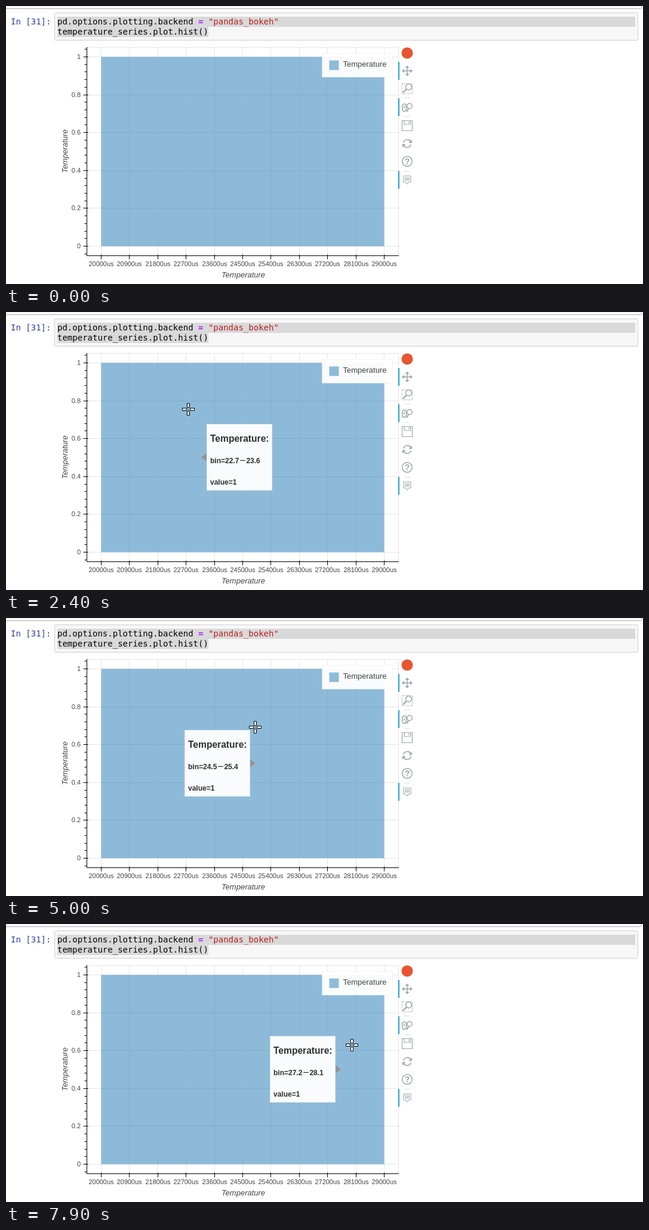
Write an HTML page that moves like this. It is 1067 by 467 pixels and loops after 8000 ms.

```html
<!DOCTYPE html>
<html lang="en">
<head>
<meta charset="utf-8">
<title>Histogram hover</title>
<style>
  html, body { margin: 0; width: 100%; height: 100%; overflow: hidden; background: #fff; }
  svg { display: block; width: 1067px; height: 467px; font-family: "Liberation Sans", Arial, sans-serif; }
  .code { font: 14px "DejaVu Sans Mono", monospace; white-space: pre; }
  .ticks { font-size: 11px; fill: #444; }
  .label { font-size: 13px; fill: #444; }
  .axis { font-style: italic; text-anchor: middle; }
  .icon { fill: none; stroke: #a1a6a9; stroke-width: 1.5; }
  .solid { fill: #a1a6a9; stroke: none; }
  .tip { font-weight: bold; font-size: 12px; fill: #2f2f2f; }
  .dash { font-family: "Noto Sans CJK SC", "Noto Sans CJK JP", "Noto Sans CJK", sans-serif; }
</style>
</head>
<body>
<svg viewBox="0 0 1067 467">
  <rect x="-5" y="-5" width="1069.5" height="9.5" rx="2" fill="#fff" stroke="#ababab"/>
  <path d="M0 .5H1062" stroke="#eee"/>

  <!-- code cell -->
  <rect x="81.5" y="11.5" width="977" height="46" rx="2" fill="#f7f7f7" stroke="#cfcfcf"/>
  <path d="M86 18H1054V35H339V52H86Z" fill="#d9d9d9"/>
  <g class="code">
    <text x="8" y="31" fill="#303f9f">In [31]:</text>
    <text x="86" y="31">pd.options.plotting.backend <tspan fill="#aa22ff" font-weight="bold">=</tspan> <tspan fill="#ba2121">"pandas_bokeh"</tspan></text>
    <text x="86" y="48">temperature_series.plot.hist()</text>
  </g>

  <!-- chart -->
  <path id="grid" stroke="#e5e5e5" fill="none"/>
  <rect x="135.5" y="69.5" width="522" height="350" fill="none" stroke="#e5e5e5"/>
  <g id="bars" fill="#1f77b4" fill-opacity=".5"></g>
  <path id="axes" stroke="#000" fill="none"/>
  <g id="ticks" class="ticks"></g>
  <text class="label axis" x="397.5" y="456">Temperature</text>
  <text class="label axis" transform="translate(103 244) rotate(-90)">Temperature</text>
  <rect x="529.5" y="79.5" width="118" height="40" fill="#fff" fill-opacity=".95" stroke="#e5e5e5" stroke-opacity=".5"/>
  <rect x="541.5" y="91.5" width="16" height="16" fill="#8fbbd9"/>
  <text class="label" x="564.5" y="102">Temperature</text>

  <!-- toolbar -->
  <circle cx="672" cy="79" r="9.5" fill="#e8552f"/>
  <path d="M658 94v30M658 155v30M658 277v30" stroke="#26a0d0" stroke-width="2"/>
  <path d="M667 154.5h10M667 185.5h10M667 277.5h10" stroke="#ddd"/>
  <g class="icon">
    <g transform="translate(672 109)">
      <path d="M-7 0H7M0 -7V7"/>
      <path class="solid" d="M0 -9l3.5 4h-7zM0 9l3.5 -4h-7zM-9 0l4 -3.5v7zM9 0l-4 -3.5v7z"/>
    </g>
    <rect x="663.5" y="130.5" width="17" height="17" stroke-width="1" stroke-dasharray="2 1.5"/>
    <circle cx="674.5" cy="136" r="5" fill="#fff"/>
    <path d="M671 139.5l-6 6" stroke-width="2.4"/>
    <rect x="664" y="164.5" width="6.5" height="12.5" rx="3.2"/>
    <path d="M667.2 168v4"/>
    <circle cx="676" cy="168" r="4.3"/>
    <path d="M674 172l-2.2 5.5" stroke-width="2"/>
    <path d="M663.5 192.5h17v17h-17zM667 192.5v6.5h10.5v-6.5M674.8 194v3" stroke-width="1.2"/>
    <path d="M665.5 229.5a7 7 0 0 1 12.5 -2M678.5 232.5a7 7 0 0 1 -12.5 2" stroke-width="1.6"/>
    <path class="solid" d="M680 224.5v5.500h-5.500zM664 237.500v-5.500h5.500z"/>
    <circle cx="672" cy="261" r="8.3"/>
    <text class="solid" x="672" y="266" font-size="14" font-weight="bold" text-anchor="middle">?</text>
    <path d="M666 285.5h12v10h-3l-3 3.5l-3 -3.5h-3zM668 288.5h8M668 290.5h8M668 292.5h8" stroke-width="1.1" stroke-linejoin="round"/>
  </g>

  <g id="tooltip" class="tip">
    <path id="pointer" fill="#909599"/>
    <rect x=".5" y="188.5" width="109" height="111" fill="#fff" fill-opacity=".95" stroke="#e0e6ea"/>
    <text x="6" y="218" font-size="15.6">Temperature:</text>
    <text x="6" y="254">bin=<tspan id="from"></tspan><tspan class="dash">－</tspan><tspan id="to"></tspan></text>
    <text x="6" y="290">value=1</text>
  </g>

  <g id="cursor" fill="#fff" stroke="#000" stroke-linejoin="round">
    <path id="arrow" d="M0 0v15l3.5 -3.5l2.500 5.500l2.500 -1l-2.500 -5.500h4.500z"/>
    <g id="cross"></g>
  </g>
</svg>
<script>
const LOOP = 8000, STEP = 100;
const LEFT = 159.5, TOP = 85.5, BOTTOM = 403.5, BINS = 10, BIN = 47.4;
const HOVER_SLACK = 2.5;
const $ = id => document.getElementById(id);
const crisp = v => Math.floor(v) + 0.5;
const repeat = (n, make) => Array.from({ length: n }, (_, i) => make(i)).join('');

function drawChart() {
  let grid = '', axes = 'M135.5 69V420M135 419.5H658', labels = '';
  for (let i = 0; i <= BINS; i++) {
    const x = crisp(LEFT + i * BIN);
    grid += `M${x} 69V419`;
    axes += `M${x} 417.5v8`;
    labels += `<text x="${x}" y="437" text-anchor="middle">${20000 + i * 900}us</text>`;
  }
  for (let i = -1; i <= 26; i++) {
    const y = crisp(BOTTOM - i * (BOTTOM - TOP) / 25);
    if (i % 5) {
      axes += `M131.5 ${y}h4`;
    } else {
      axes += `M129.5 ${y}h8`;
      grid += `M136 ${y}H657`;
      labels += `<text x="125" y="${y + 3.5}" text-anchor="end">${i / 25}</text>`;
    }
  }
  $('grid').setAttribute('d', grid);
  $('axes').setAttribute('d', axes);
  $('ticks').innerHTML = labels;
  $('bars').innerHTML = repeat(BINS, i =>
    `<rect x="${LEFT + i * BIN}" y="${TOP}" width="${BIN}" height="${BOTTOM - TOP}"/>`);
  $('cross').innerHTML = repeat(4, i =>
    `<path transform="rotate(${i * 90})" d="M3 -2H10V2H3Z"/>`) +
    '<circle r=".7" fill="#000" stroke="none"/>';
}

// Cursor glides: start time, end time, x and y reached
const entry = { x: 72, y: 0, time: 400 };
const glides = [
  [400, 900, 182, 143],
  [1000, 1100, 192, 122],
  [1300, 1500, 209, 139],
  [1500, 2600, 316, 166],
  [2800, 3000, 322, 167],
  [3300, 3900, 356, 176],
  [4100, 4600, 405, 182],
  [4900, 5500, 460, 185],
  [5800, 6300, 483, 189],
  [6700, 7000, 518, 192],
  [7100, 7600, 570, 199],
  [7700, 7900, 579, 203]
];
const easeOut = f => 1 - Math.pow(1 - f, 1.35);

function cursorAt(t) {
  let { x, y } = entry;
  for (const [start, end, toX, toY] of glides) {
    if (t <= start) break;
    const f = easeOut(Math.min(1, (t - start) / (end - start)));
    x += (toX - x) * f;
    y += (toY - y) * f;
  }
  return { x, y };
}

function show(id, visible) {
  $(id).setAttribute('display', visible ? 'inline' : 'none');
}

function placeTooltip(bin) {
  const onRight = bin < BINS / 2;
  const x = Math.round(194.2 + bin * BIN - (onRight ? 0 : 131.8));
  const from = 20 + bin * 0.9;
  $('tooltip').setAttribute('transform', `translate(${x} 0)`);
  $('pointer').setAttribute('d', onRight ? 'M0 237v14l-9 -7z' : 'M110 237v14l9 -7z');
  $('from').textContent = from.toFixed(1);
  $('to').textContent = (from + 0.9).toFixed(1);
}

function render(time) {
  const t = Math.floor(time % LOOP / STEP) * STEP;
  const { x, y } = cursorAt(t);
  const inPlot = x > 135 && y > 69;
  show('cursor', t >= entry.time);
  show('arrow', !inPlot);
  show('cross', inPlot);
  $('cursor').setAttribute('transform', `translate(${crisp(x + 0.5)} ${crisp(y + 0.5)})`);

  // The tooltip trails the cursor slightly.
  const hoverX = x - HOVER_SLACK;
  const hovering = hoverX > LEFT && y > TOP;
  show('tooltip', hovering);
  if (hovering) placeTooltip(Math.floor((hoverX - LEFT) / BIN));
}

drawChart();
const start = performance.now();
function tick() {
  render(performance.now() - start);
  requestAnimationFrame(tick);
}
tick();
</script>
</body>
</html>
```
